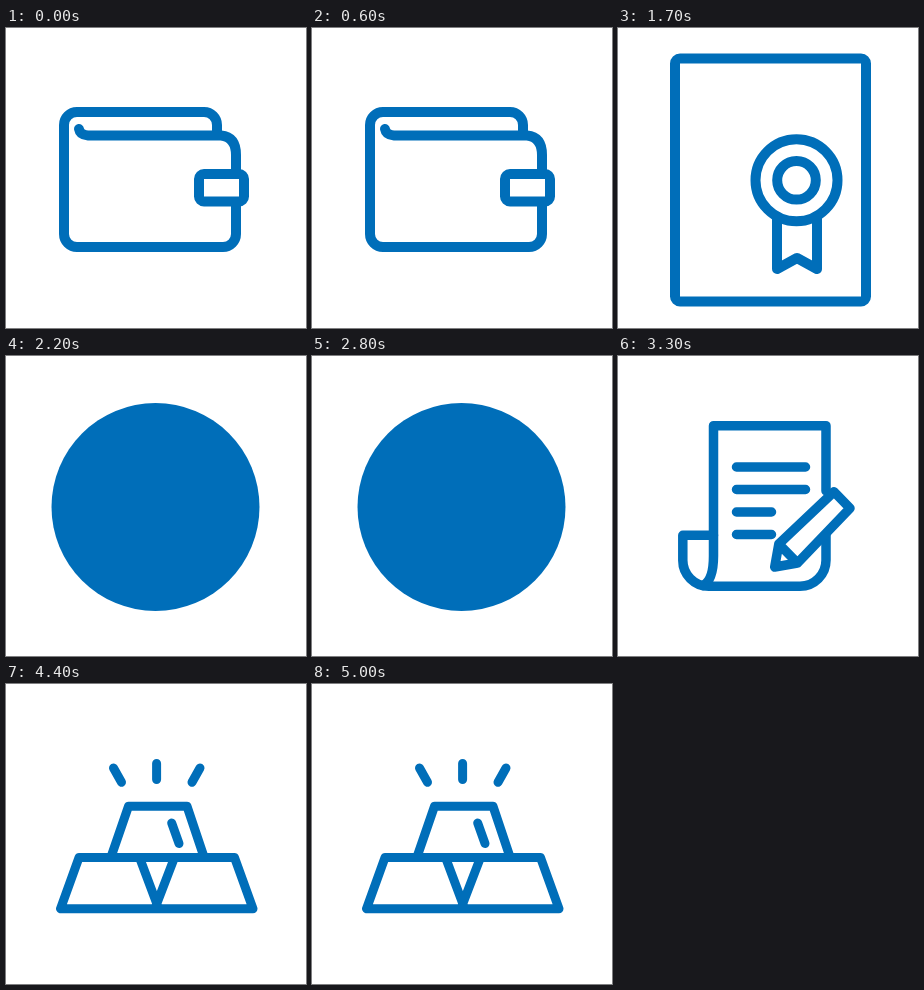
An HTML page without scripts for the animation above (5.5 s loop, 300 px wide and 300 px high).

```html
<!DOCTYPE html>
<html lang="en">
<head>
<meta charset="utf-8">
<title>Icon loop</title>
<style>
  html, body { margin: 0; width: 100%; height: 100%; overflow: hidden; background: #fff; }
  svg { display: block; width: 100%; height: 100%; }

  .stage {
    fill: none;
    stroke: #006eb9;
    stroke-width: 9.5;
    stroke-linecap: round;
    stroke-linejoin: round;
    animation: hop 1.1s step-end -2ms infinite;
  }
  .icon {
    visibility: hidden;
    animation: show 5.5s step-end calc((var(--i) - 5) * 1.1s - 2ms) infinite;
  }
  .butt { stroke-linecap: butt; }
  .disc { fill: #006eb9; stroke: none; }

  /* each icon holds for a fifth of the loop */
  @keyframes show {
    0% { visibility: visible; }
    20%, 100% { visibility: hidden; }
  }
  /* 100 ms drop halfway through each icon */
  @keyframes hop {
    0% { transform: translateY(0); }
    45.4545% { transform: translateY(10px); }
    54.5454%, 100% { transform: translateY(0); }
  }
</style>
</head>
<body>
<svg viewBox="0 0 300 300">
  <g class="stage">
    <!-- wallet -->
    <g class="icon" style="--i:0" stroke-width="10">
      <path class="butt" d="M211 104V97A13 13 0 0 0 198 84H71A13 13 0 0 0 58 97V206A13 13 0 0 0 71 219H217A13 13 0 0 0 230 206V176"/>
      <path d="M73 101Q74 107 82 107.5H215Q230 109 230 127V143"/>
      <rect x="193" y="146" width="45" height="27.5" rx="5"/>
    </g>

    <!-- certificate -->
    <g class="icon" style="--i:1" stroke-width="10">
      <rect x="57" y="30.5" width="191" height="243" rx="5"/>
      <circle cx="178.5" cy="152.3" r="41"/>
      <circle cx="178.5" cy="152.3" r="19.3"/>
      <path d="M159 190V241L179 230L199 241V190"/>
    </g>

    <!-- disc -->
    <g class="icon" style="--i:2">
      <circle class="disc" cx="149.5" cy="151" r="104"/>
    </g>

    <!-- contract and pencil -->
    <g class="icon" style="--i:3">
      <path d="M85 229.5C92 226 95.5 215 95.5 200V69.7H208V135"/>
      <path d="M95.5 179.3H64.8V204A26 26 0 0 0 90.8 230.3H182A26 26 0 0 0 208 204.3V179"/>
      <path d="M118.5 111H187.5M118.5 133.5H187.5M118.5 156H153.5M118.5 178.5H153.5"/>
      <path d="M156.7 211L160.8 188L216 135.7L232 152.3L179.5 207ZM160.8 188L179.5 207"/>
    </g>

    <!-- gold bars -->
    <g class="icon" style="--i:4" stroke-width="9">
      <path d="M105 173L122.5 122.3H181L198 173"/>
      <path d="M133.5 173.5H73L54.5 224.7H247L228.5 173.5H133.5L151.3 221M168.5 173.5L150.3 221"/>
      <path d="M165.7 139L173 159.5M107.5 84L115.5 98.3M150.6 79.5V95.5M194 84L186 98.3"/>
    </g>
  </g>
</svg>
</body>
</html>
```
